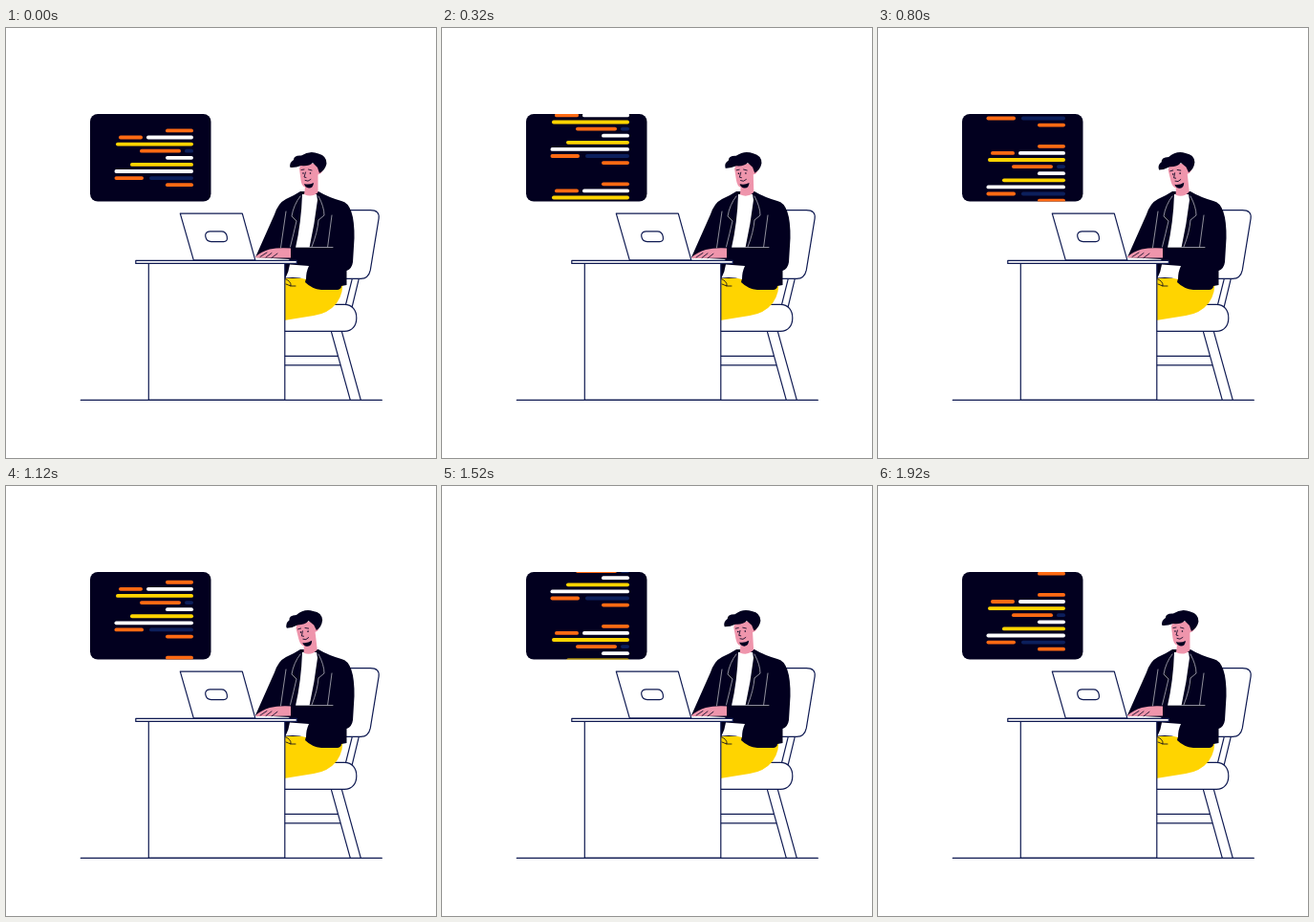
These frames come from a looping animation (450x450 px, 2 s). An HTML page:

```html
<!DOCTYPE html>
<html lang="en">
<head>
<meta charset="utf-8">
<title>Coder at a desk</title>
<style>
html, body { margin: 0; width: 100%; height: 100%; overflow: hidden; background: #fff; }
svg { display: block; width: 100vw; height: 100vh; }
.line { fill: none; stroke: #0f1a52; stroke-width: 1.2; stroke-linecap: round; stroke-linejoin: round; }
.solid { fill: #fff; }
.dark { fill: #02001f; }
.skin { fill: #ef95ac; }
.seam { fill: none; stroke: #b4b4bc; stroke-width: .8; stroke-linecap: round; }
.fine { fill: none; stroke: #02001f; stroke-width: .8; stroke-linecap: round; }
</style>
</head>
<body>
<svg viewBox="0 0 450 450">
  <defs><clipPath id="screen"><rect x="88" y="90" width="126.500" height="91.500" rx="8"/></clipPath></defs>

  <rect class="dark" x="88" y="90" width="126.500" height="91.500" rx="8"/>
  <g clip-path="url(#screen)"><g id="code" stroke-width="3.800" stroke-linecap="round"></g></g>

  <!-- chair -->
  <g class="line" transform="translate(.3 .4)">
    <path d="M362 262 355 290M369 262 362 291M340 317 360 389M351 317 371 389M291 343H347M291 352.500H350"/>
    <path class="solid" d="M355 190.300H381Q391 190.300 389.800 199L381 253Q379 262 371 262H350Z"/>
    <path class="solid" d="M291 289H354C362 289 366.500 295 366.500 303S362 317 354 317H291Z"/>
  </g>

  <!-- body -->
  <path fill="#ffd400" d="M291 262H352Q354 277 346 288Q337 299 322 301L291 306Z"/>
  <path class="fine" d="M291 262Q299 265 298 270L293 268M298 270H303"/>
  <path class="dark" d="M308 171Q302 175 293 179Q285 183 281 195L261 240L297 242 291 246V262L314 262 313 266Q320 273 330 274L347 274Q351 273 351 270L356.500 269V254Q362 252 363 245L364.500 220Q365 184 351 181Q337 177 327 171Z"/>
  <path class="solid" d="M297 247.500 317 249Q314 255 314 263Q304 260 292.500 261.500Q296 255 297 247.500Z"/>
  <path class="solid" d="M310 174H325L326 180Q323 205 317.500 230H303Q309 204 310 174Z"/>
  <path class="seam" d="M308 176Q301 185 299 197L304 202Q301 215 297.500 229M327 176Q333 187 333 196L327 201Q326 214 320 229M293 192 287.500 230M341 196 336.500 230"/>

  <g id="head">
    <path class="skin" d="M309 142H328Q333 145 331 150Q330 153 326.500 153.500V172Q320 178 312 174L313 166.500Q309.500 166 308.500 159L307 147Z"/>
    <path class="dark" d="M297.500 146Q296 141 301 138Q301 133 309 133.500Q318 127.500 327 131.500Q336 134 335.500 142Q334 149 328 152L326 146 321 141Q317 145 309 144Q303 146.500 297.500 146Z"/>
    <path class="dark" d="M312 163Q317 164.500 322 162Q321.500 167.500 317 167.500Q313 167 312 163Z"/>
    <path class="fine" d="M309 148.500 312 148M316.500 148 320 149M313.500 151 312 156 314 156.500M313 159.500Q316 161.500 319 158.500"/>
    <g id="eyes" class="dark"><circle cx="311" cy="152" r=".8"/><circle cx="318.500" cy="152" r=".8"/></g>
  </g>

  <!-- desk and laptop -->
  <g class="line" transform="translate(.3 .4)">
    <path class="solid" d="M149 246H291.500V389H149Z"/>
    <path class="solid" d="M135.500 243H304V246H135.500Z"/>
    <path class="solid" d="M182 193.700H247L260.500 242.500H196Z"/>
    <path d="M213 212.500H225Q230 212.500 231 218T227 223.200H214.500Q209.500 223 208.500 218T213 212.500Z"/>
    <path d="M78 389H393"/>
  </g>

  <g id="hand">
    <path class="skin" d="M299 230.500Q285 229.500 276 231.500Q267 234 261 239.500Q261 241 264 240.500H299Z"/>
    <path class="fine" d="M266 239.500 273 235M272 240 278 235.500M278 240.500 284 236"/>
  </g>
  <path class="dark" d="M298 229.500H344V242H298Z"/>
  <path class="seam" d="M304 229.500 342 229.500"/>
</svg>
<script>
const LOOP = 2000, PERIOD = 79, STEP = 7.1;
const HOLD = .04; // share of each scroll spent at rest before moving
const O = '#ff6a13', Y = '#ffd400', W = '#fff', N = '#0c1f5c';
const rows = [
  [[167, 196, O]],
  [[118, 143, O], [147, 196, W]],
  [[115, 196, Y]],
  [[140, 183, O], [187, 196, N]],
  [[167, 196, W]],
  [[130, 196, Y]],
  [[113.5, 196, W]],
  [[113.5, 144, O], [150, 196, N]],
  [[167, 196, O]]
];
const el = id => document.getElementById(id);
const code = el('code'), head = el('head'), hand = el('hand'), eyes = el('eyes');

const bars = rows.flatMap((row, i) => row.map(([a, b, color]) =>
  `<path stroke="${color}" d="M${a + 1.9} ${107.4 + i * STEP}H${b - 1.9}"/>`)).join('');
code.innerHTML = [0, 1].map(k => `<g transform="translate(0 ${k * PERIOD})">${bars}</g>`).join('');

function draw(now) {
  const p = now % LOOP / LOOP;
  const scroll = Math.max(0, (p * 2 % 1 - HOLD) / (1 - HOLD));
  const lean = (1 - Math.cos(p * 2 * Math.PI)) / 2;
  const tap = Math.sin(p * 10 * Math.PI);
  code.setAttribute('transform', `translate(0 ${-scroll * PERIOD})`);
  head.setAttribute('transform', `rotate(${-7 * lean} 319 178)`);
  eyes.setAttribute('transform', `translate(${lean * .6} 0)`);
  hand.setAttribute('transform', `rotate(${tap} 299 236)`);
  requestAnimationFrame(draw);
}
requestAnimationFrame(draw);
</script>
</body>
</html>
```
